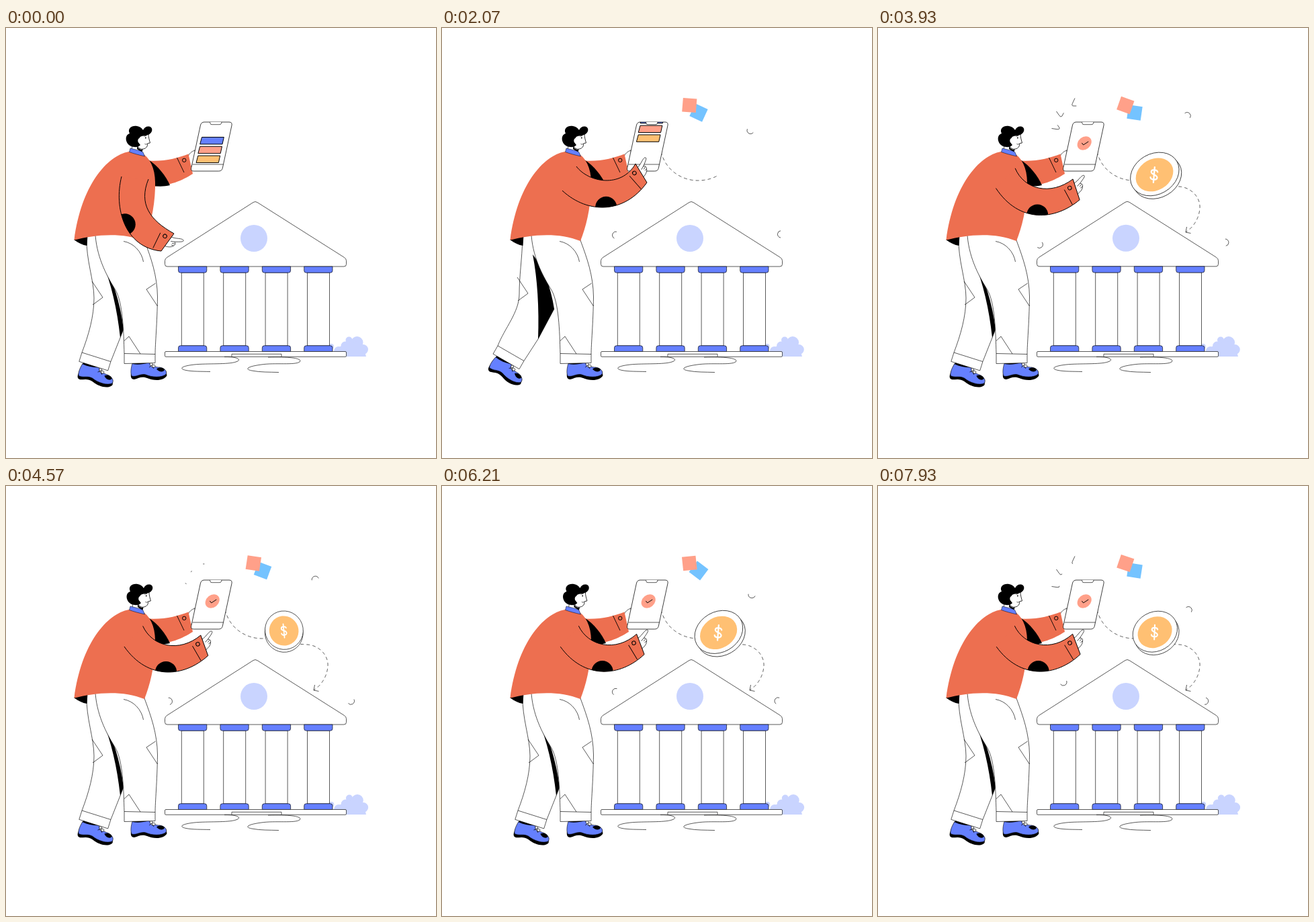
Recreate the animation shown at these times as an HTML page with a canvas. Size 640 by 640 pixels, loop 8000 ms.

```html
<!DOCTYPE html>
<html lang="en">
<head>
<meta charset="utf-8">
<title>Mobile banking</title>
<style>
html, body { margin: 0; width: 100%; height: 100%; overflow: hidden; background: #fff; }
canvas { display: block; width: 640px; height: 640px; }
</style>
</head>
<body>
<canvas id="stage"></canvas>
<script>
const LOOP = 8000, TAU = Math.PI * 2, DEG = Math.PI / 180;
const BLUE = '#6580ff', PALE = '#c9d4ff', RED = '#ed6f50', PINK = '#ffa089',
      AMBER = '#ffc073', SKY = '#74c3ff', INK = '#000', WHITE = '#fff';
const canvas = document.getElementById('stage');
const c = canvas.getContext('2d');
const dpr = window.devicePixelRatio || 1;
canvas.width = canvas.height = 640 * dpr;

const mix = (a, b, u) => a + (b - a) * u;
const mixAll = (a, b, u) => a.map((v, i) => mix(v, b[i], u));
const clamp = u => Math.max(0, Math.min(1, u));
const lin = (t, a, b) => clamp((t - a) / (b - a));
const ease = (t, a, b) => { const u = lin(t, a, b); return u * u * (3 - 2 * u); };
const wave = (t, peak, period) => Math.cos((t - peak) / period * TAU);
const pop = (t, a, b) => {
  const u = lin(t, a, b) - 1;
  return u === -1 ? 0 : 1 + 2.7 * u * u * u + 1.7 * u * u;
};

function paint(path, fill, line, width = 0.65) {
  if (fill) { c.fillStyle = fill; c.fill(path); }
  if (line) { c.strokeStyle = line; c.lineWidth = width; c.stroke(path); }
}
const draw = (d, fill, line, width) => paint(new Path2D(d), fill, line, width);
function disc(x, y, r, fill, line, width) {
  const p = new Path2D();
  p.arc(x, y, r, 0, TAU);
  paint(p, fill, line, width);
}
function group(fn) { c.save(); fn(); c.restore(); }

// ---- bank ----
function bush(t) {
  group(() => {
    c.translate(512, 489);
    c.transform(1, 0, 0.02 * wave(t, 430, 1725), 1, 0, 0);
    for (const [x, y, r] of [[-28, -15, 4], [-17, -8, 7], [-7, -16, 6.5], [-1.5, -24.5, 5],
                             [10.5, -21, 9], [19.5, -10.5, 7.5]]) disc(x, y, r, PALE);
    draw('M-22 0V-10L-8 -19L10 -23L21 -11L24 0Z', PALE);
  });
}

function bank(t) {
  const d = Math.max(0, t - 2700);
  const squash = 1 - 0.04 * Math.sin(d / 700 * Math.PI) * Math.exp(-d / 380);
  group(() => {
    c.translate(0, 489);
    c.scale(1, squash);
    c.translate(0, -489);
    draw('M368 259.5Q371 257.5 374 259.5L503.5 341.5Q506.5 343.5 506.5 346.5V351.5Q506.5 355 503 355H240Q236.5 355 236.5 351.5V346.5Q236.5 343.5 239.5 341.5Z', WHITE, INK);
    disc(369, 313, 20, PALE);
    for (let i = 0; i < 4; i++) group(() => {
      c.translate(i * 62.4, 0);
      draw('M261.3 364H294.3V473H261.3Z', WHITE, INK);
      draw('M256.5 355H298.8V361Q298.8 364.2 295.6 364.2H259.7Q256.5 364.2 256.5 361Z', BLUE, INK);
      draw('M256.5 481.5V476Q256.5 472.8 259.7 472.8H295.6Q298.8 472.8 298.8 476V481.5Z', BLUE, INK);
    });
    draw('M238 481.5H505Q506.5 481.5 506.5 483V487.8Q506.5 489.3 505 489.3H238Q236.5 489.3 236.5 487.8V483Q236.5 481.5 238 481.5Z', WHITE, INK);
    draw('M336 489V485.3H410V489', null, INK);
  });
  draw('M325 489.5C345 489 352 494 342 497C330 501 300 499 280 501C262 503 256 507 268 509.5C278 511.5 290 511 304 511.5', null, INK);
  draw('M390 490C425 489 442 492 437 497C430 502 400 498 380 501C358 504 355 508 366 510C378 512.5 392 512 406 512.5', null, INK);
}

// ---- dashed route ----
const route = (() => {
  const p = document.createElementNS('http://www.w3.org/2000/svg', 'path');
  p.setAttribute('d', 'M326 184C332 210 355 227 381 227C400 227 416 219 422 208C425 200 418 196 412 198C404 201 400 212 403 219C409 233 428 235 448 236C466 237 480 252 479 268C478 283 470 296 458 304');
  const len = p.getTotalLength();
  return Array.from({ length: 241 }, (_, i) => p.getPointAtLength(len * i / 240));
})();

function trail(t) {
  const n = Math.round(240 * ease(t, 1700, 2640));
  if (!n) return;
  group(() => {
    const p = new Path2D();
    for (let i = 0; i <= n; i++) p.lineTo(route[i].x, route[i].y);
    c.setLineDash([5, 4]);
    paint(p, null, INK);
  });
  if (t > 2640) draw('M459.5 296L458 304L465.5 305.5', null, INK);
}

// ---- floating bits ----
function squares(t) {
  const s = pop(t, 350, 800);
  if (!s) return;
  const swing = ease(t, 600, 3700) - ease(t, 3700, 5710) + ease(t, 5710, 8300);
  const tile = (x, y, turn, color) => group(() => {
    c.translate(x, y);
    c.rotate(turn * DEG);
    c.scale(s, s);
    c.fillStyle = color;
    c.fillRect(-10.3, -10.3, 20.6, 20.6);
  });
  tile(382, 126, 40 - 33 * swing, SKY);
  tile(368.3, 115, -9 + 29.5 * swing, PINK);
}

// Spinning arc that drifts to (x, y), then off in another direction
function hook(t, turnAt, x, y, before, after, angle, spin) {
  const s = ease(t, 700, 1000);
  if (!s) return;
  const d = t - turnAt, [vx, vy] = d < 0 ? before : after;
  const mid = (angle + spin * (t - 2070)) * DEG, p = new Path2D();
  p.arc(x + vx * d, y + vy * d, 5.2, mid - 1.45 * s, mid + 1.45 * s);
  paint(p, null, INK);
}
function hooks(t) {
  hook(t, 3800, 460, 129, [0.0005, -0.0135], [0.0005, 0.0135], 120, -0.0904);
  hook(t, 4150, 238, 324, [-0.01, 0.0075], [0.01, -0.0085], 200, -0.085);
  hook(t, 4050, 517.5, 320, [0.0065, 0.0066], [-0.008, 0], 180, 0.094);
}

function sparks(t) {
  const grow = t < 6000 ? lin(t, 2800, 3080) : lin(t, 7730, 8010);
  const gone = t < 6000 ? lin(t, 4350, 4600) : 0;
  if (!grow || gone === 1) return;
  group(() => {
    c.setLineDash([18 * (grow - gone), 99]);
    c.lineDashOffset = -18 * gone;
    draw('M293 104.5L289.3 112.5Q287.8 116 291 116L296 116', null, INK);
    draw('M265.5 124L270 130.5Q272 133.5 274 131L276.5 126', null, INK);
    draw('M258.5 149.5L267 150.8Q271 151 269.7 148L266.5 143.5', null, INK);
  });
}

// ---- coin: two tilts given as half width², half height², shear, centre, rim offset ----
const FLAT = [1332, 1056, -239, 411.8, 217.5, 3.8, 4.6];
const STEEP = [812, 1056, 211, 415.5, 212.5, -3.3, 4.6];
function coin(t) {
  const enter = pop(t, 3150, 3650);
  if (!enter) return;
  const p = wave(t, 4000, 2100), w = (1 - p) / 2;
  const [xx, yy, xy, x, y, dx, dy] = mixAll(FLAT, STEEP, w);
  const s = enter * (1 - 0.12 * (1 - p * p));
  const half = (xx + yy) / 2, d = Math.hypot((xx - yy) / 2, xy);
  const turn = Math.atan2(2 * xy, xx - yy) / 2;
  const oval = (ox, oy, k, fill, line) => {
    const e = new Path2D();
    e.ellipse(ox, oy, Math.sqrt(half + d) * k, Math.sqrt(half - d) * k, turn, 0, TAU);
    paint(e, fill, line, 0.75);
  };
  group(() => {
    c.translate(x, y);
    c.scale(s, s);
    oval(dx, dy, 1, WHITE, INK);
    oval(0, 0, 1, WHITE, INK);
    oval(-0.3, 1, 0.77, AMBER);
    c.translate(-1 + w, 1);
    c.rotate(mix(5, -14, w) * DEG);
    c.scale(1 - 0.25 * w, 1);
    c.lineCap = 'round';
    draw('M5 -4.5C4 -8 -4.5 -8.5 -4.5 -4C-4.5 0 5 -0.5 5 4C5 8.5 -4.5 8 -5 4.2M0 -11.5V11.5', null, WHITE, 2.3);
  });
}

// ---- phone ----
function phone(t) {
  const body = new Path2D('M295 140H332Q337 140 336 145L322.3 208.5Q321.3 213 316.5 213H279.5Q274.7 213 275.7 208.5L289.4 145Q290.5 140 295 140Z');
  paint(body, WHITE);
  group(() => {
    c.clip(body);
    const up = 69 * ease(t, 1650, 2550);
    [BLUE, PINK, AMBER].forEach((color, i) => {
      const y = 13.8 * i - up;
      group(() => {
        c.translate(291.5 - y * 0.205, 162.5 + y);
        draw('M0 0H32.8L30.5 10.4H-2.8Z', color, INK, 1);
      });
    });
  });
  const s = pop(t, 2450, 2800);
  if (s) group(() => {
    c.translate(307.2, 171.5);
    c.transform(s, 0, -0.22 * s, s, 0, 0);
    disc(0, 0, 10.3, PINK);
    draw('M-4 -0.5L-1 2.5L5.5 -2.5', null, INK, 0.9);
  });
  paint(body, null, INK, 0.75);
  draw('M277.5 203H323.5', null, INK);
  draw('M303.5 140L304 142Q304.3 143.7 306 143.7H318Q320 143.7 320.4 142L321 140', WHITE, INK);
}

// ---- legs ----
function shoe(x, y, turn) {
  group(() => {
    c.translate(x, y);
    c.rotate(turn * DEG);
    c.translate(-200, -499);
    draw('M187 510C185 517 185 523 191 523C198 521 202 518 210 521C221 526 236 525 239.5 517L238 510Z', INK);
    draw('M188 499C186 506 185 513 187 518C194 520 200 514 208 516C217 520 232 521 238.5 515C240 510 235 506 229 505C222 505 216 503 213 498Z', BLUE, INK, 0.6);
    draw('M188.5 496L188 500C196 501.5 205 500.5 213 498L212 496Z', INK);
    draw('M224 507.5C228 504.5 234 505 236 508.5C235 512.5 228 513 224 507.5Z', INK);
    draw('M214 500C215 497 219 498 217.5 502C220 500 224 502 221 505C218 506 215 504 214 500Z', WHITE, INK, 0.7);
    draw('M213 505L217 502L220 507', null, INK, 0.7);
  });
}

// Knee, trouser cuff, cuff angle, then the dark inner side: top, tip, back
const STAND = [131, 402, 113, 483, 17.5, 143, 347, 170, 461, 175, 448];
const STRIDE = [115, 396, 83, 473, 30, 135, 337, 143, 463, 167, 418];

function legs(t) {
  const w = t < 1950 ? ease(t, 700, 1750) : 1 - ease(t, 2150, 3400);
  const [kx, ky, x, y, turn, ax, ay, bx, by, ex, ey] = mixAll(STAND, STRIDE, w);
  const cos = Math.cos(turn * DEG), sin = Math.sin(turn * DEG);
  const cuff = (u, v) => `${x + u * cos - v * sin} ${y + u * sin + v * cos}`;
  shoe(x + 18 * cos - 15 * sin, y + 18 * sin + 15 * cos, turn - 1.5);
  draw(`M160 300H120V312C119 345 ${kx} ${ky - 27} ${kx} ${ky}S${x + 10} ${y - 26} ${x} ${y}`
     + `L${cuff(0, 14)}L${cuff(45, 14)}L${cuff(45, 0)}L${bx} ${by}L${ex} ${ey}`, WHITE, INK);
  draw(`M${x} ${y}L${cuff(45, 0)}M${kx - 3} ${ky - 25}l16 24l-15 11`, null, INK);
  draw(`M${ax} ${ay}Q${(ax + bx) / 2 + 6.5} ${(ay + by) / 2 - 8} ${bx} ${by}`
     + `L${ex} ${ey}Q${(ax + ex) / 2 + 8} ${(ay + ey) / 2 - 10} ${ax} ${ay}Z`, INK);
  shoe(200, 499, 0);
  draw('M133 300V309C136 345 152 372 163 390C174 410 175 450 176 485V499.5L222 498.5V486C222 470 225 440 225.5 400C225 368 216 343 206 316V300', WHITE, INK);
  draw('M176 484.5L222 485.5M175 317.5C190 320 202 333 204.5 348M222.5 380L209 389L225.5 414M176 465.5L183 459L200 485', null, INK);
}

// ---- upper body ----
function head(t) {
  group(() => {
    c.translate(2 * (ease(t, 4000, 5200) - ease(t, 5200, 8000)), 0);
    draw('M188 174L187 183L202 186L203 180Z', WHITE, INK);
    draw('M195 176C197 180 200 181.5 203.5 181L202 185L195 180Z', INK);
    draw('M197 160L212 158C212 163 213.5 167 214.5 171L210.5 172C211 176 209 179 204.5 180C200 181 197 179 196 175Z', WHITE, INK, 0.8);
    draw('M184 157C180 149 188 144.5 195 146C199 146.5 202 149 204 152C206 147 212 145 216 148C219.5 152 216 158 210 159.5C205 161 200 160 198.5 164C196 168 198 172 200 174C198 178 186 179 181 172C177 166 178 159 184 157Z', INK);
    disc(200.3, 167.8, 4, WHITE);
    disc(207.8, 163.5, 0.9, INK);
    draw('M205 161L209 160.5M206.5 172.5Q208.5 174 210 172.5', null, INK);
  });
}

function farArm() {
  draw('M271 192C272 187 276 184 281 182L283 204L274 206Z', WHITE, INK);
  draw('M205 197C232 200 255 194 271.5 187.5L278 217C262 227 245 235 215 236Z', RED);
  draw('M212 196C226 205 238 220 244 234C236 236 228 236 218 235Z', INK);
  draw('M254.5 193L265 215', null, INK, 0.9);
  disc(265.2, 196.8, 2.7, null, INK, 1);
}

function jacket() {
  draw('M101 315C108 320 114 323 120.5 324L121.5 308Z', INK);
  draw('M183 184C150 190 112 235 101.5 315.5C130 308 172 303 206 317C214 297 221 270 222 238C223 215 218 198 205 188Z', RED);
  draw('M185 179C192 181 200 182 204 185L206.5 191C198 189 190 187 183.5 184.5Z', BLUE, INK, 0.5);
}

// Sleeve poses: lower edge to the cuff, then upper edge back to the shoulder
const LOW = [172, 221, 160, 268, 177, 327, 231, 332, 250, 306, 214, 286, 197, 262, 212, 225];
const MID = [174, 237, 207, 297, 260, 291, 298, 267, 291, 235, 252, 255, 217, 245, 206, 210];
const HIGH = [179, 242, 218, 278, 272, 276, 305, 230, 288, 202, 267, 239, 218, 230, 200, 206];

function armPose(t) {
  const swipe = mix(0.6, 1, ease(t, 1650, 2070));
  const sway = 0.26 - 0.23 * wave(t, 5170, 1725);
  const high = mixAll(MID, HIGH, mix(swipe, sway, ease(t, 2250, 2950)));
  return mixAll(LOW, high, ease(t, 100, 1400));
}

function nearArm(t) {
  const p = armPose(t);
  const dx = p[6] - p[8], dy = p[7] - p[9], len = Math.hypot(dx, dy);
  const atCuff = fn => group(() => {
    c.translate(p[8], p[9]);
    c.rotate(Math.atan2(dy, dx));
    fn();
  });
  atCuff(() => {
    c.translate(8.3, -4);
    c.rotate(-123 * DEG);
    draw('M-8 -7C-3 -3 2 -2.5 8 -2.2C12 -2 15.8 -1.5 15.8 0.5C15.8 2.5 12 2.6 2.5 3C5 5 4 8 1.5 9C-1 11.5 -8 12 -14 9Z', WHITE, INK);
    draw('M2.5 3L-3 2.5M3.5 6L-1 5.5M1.5 9L-2 8', null, INK);
  });
  const sleeve = new Path2D();
  sleeve.moveTo(p[0], p[1]);
  sleeve.bezierCurveTo(...p.slice(2, 8));
  sleeve.lineTo(p[8], p[9]);
  sleeve.bezierCurveTo(...p.slice(10, 16));
  paint(sleeve, RED);
  // The elbow patch sits halfway along the lower edge
  const elbow = i => (p[i] + 3 * p[i + 2] + 3 * p[i + 4] + p[i + 6]) / 8;
  group(() => { c.clip(sleeve); disc(elbow(0), elbow(1), 16, INK); });
  paint(sleeve, null, INK, 1);
  atCuff(() => {
    draw(`M11 17L${len + 3.5} 12.5`, null, INK, 0.9);
    disc(11, 8.6, 2.8, null, INK, 1);
  });
}

function frame() {
  const t = performance.now() % LOOP;
  c.setTransform(dpr, 0, 0, dpr, 0, 0);
  c.lineJoin = 'round';
  c.fillStyle = WHITE;
  c.fillRect(0, 0, 640, 640);
  for (const part of [bush, bank, trail, squares, hooks, sparks, coin,
                      legs, farArm, phone, head, jacket, nearArm]) part(t);
  requestAnimationFrame(frame);
}
frame();
</script>
</body>
</html>
```
